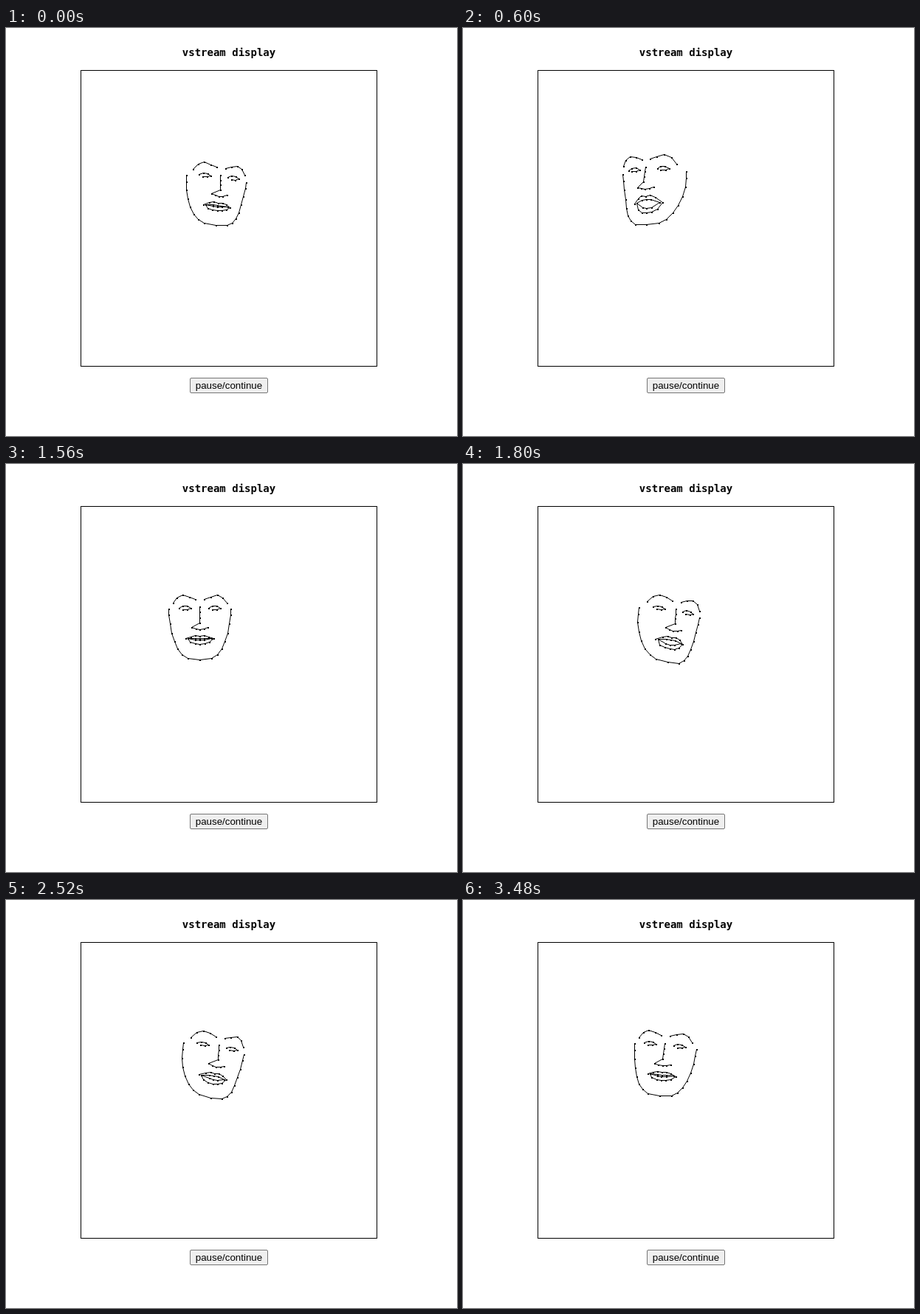
These frames come from a looping animation (611 px wide and 553 px high, 3600 ms). An HTML page with a canvas:

```html
<!DOCTYPE html>
<html lang="en">
<head>
<meta charset="utf-8">
<title>vstream display</title>
<style>
  html, body { margin: 0; width: 611px; height: 553px; overflow: hidden; background: #fff; }
  body { position: relative; }
  canvas { position: absolute; left: 0; top: 0; }
  h1 {
    position: absolute; left: 102px; top: 24px; width: 400px; margin: 0;
    font: bold 14px/19px "DejaVu Sans Mono", monospace;
    text-align: center; color: #000;
  }
  button {
    position: absolute; left: 249px; top: 474px; width: 106px; height: 21px;
    box-sizing: border-box; margin: 0; padding: 0;
    border: 1px solid #767676; border-radius: 2px; background: #efefef;
    font: 13.333px/19px "Liberation Sans", Arial, sans-serif; color: #000;
    text-align: center; white-space: nowrap;
  }
</style>
</head>
<body>
<canvas id="stage" width="611" height="553"></canvas>
<h1>vstream display</h1>
<button type="button">pause/continue</button>
<script>
const LOOP = 3600, STEP = 120;
const ctx = document.getElementById("stage").getContext("2d");

// Head poses; angles in degrees, open = how far the lower lip drops.
const keys = [
  { t: 0,    x: 285.5, y: 205,   yaw: 7.5, pitch: 5,  roll: 6.5,   open: 0,  size: 0.97 },
  { t: 600,  x: 260,   y: 197,   yaw: -16, pitch: 9,  roll: -3,    open: 11, size: 1.03 },
  { t: 1080, x: 245.5, y: 199,   yaw: -35, pitch: 11, roll: -12.5, open: 2,  size: 1 },
  { t: 1200, x: 239,   y: 199,   yaw: -38, pitch: 11, roll: -13,   open: 1,  size: 1 },
  { t: 1560, x: 263,   y: 196.5, yaw: 0,   pitch: 0,  roll: 0,     open: 0,  size: 1 },
  { t: 1800, x: 280,   y: 202,   yaw: 11,  pitch: 6,  roll: 10,    open: 5,  size: 1 },
  { t: 2160, x: 284,   y: 203.5, yaw: 14,  pitch: 7,  roll: 12.7,  open: 7,  size: 1 },
  { t: 2880, x: 280,   y: 200.5, yaw: 4,   pitch: 4,  roll: 8.3,   open: 0,  size: 1 },
  { t: 3480, x: 275,   y: 199,   yaw: -2,  pitch: 2,  roll: 5.5,   open: 0,  size: 1 }
];

// Right half of the face, outside to centre: x, y, depth, share of the mouth opening.
const brow = [[36.5, -7.5, 19], [31, -15, 25], [23.5, -18.5, 31], [14.5, -16, 35], [6, -13, 37]];
const eye = [[28, -1, 25], [23, -3.5, 28], [17, -3.5, 29], [12, -1, 28], [17, 1, 29], [23, 1, 28]];
const nostril = [[11, 25.5, 47], [5.5, 27.5, 49], [0, 28.5, 50]];
const upperLip = [[19, 40.5, 35, 0.4], [12, 38, 43, 0.1], [6, 36.5, 47], [0, 37.5, 48]];
const lowerLip = [[13, 45.5, 42, 0.8], [6.5, 47.5, 47, 1], [0, 48.5, 49, 1]];
const upperInner = [[16, 40.5, 38, 0.4], [6, 40.5, 45, 0.1], [0, 40.5, 46, 0.1]];
const lowerInner = [[6, 42, 45, 0.9], [0, 42.5, 46, 1]];

const flip = half => half.map(([x, ...rest]) => [-x, ...rest]);
const span = half => [...flip(half), ...half.slice(0, -1).reverse()];
const ring = (top, low) => [...span(top), ...span(low).reverse()];

const bridge = [0, 1, 2, 3].map(i => [0, -2.5 + 22 * i / 3, 40 + 16 * i / 3]);
const inner = ring(upperInner, lowerInner);
const paths = [
  flip(brow),
  brow,
  [...bridge, ...span(nostril)],
  flip(eye),
  [...eye.slice(0, 4).reverse(), ...eye.slice(4).reverse()],
  [...ring(upperLip, lowerLip), ...inner]
];

// The outline keeps its width when the head turns; only the chin swings.
function jaw(turn) {
  return Array.from({ length: 17 }, (_, i) => {
    const a = Math.PI * i / 16, c = Math.cos(a), s = Math.sin(a);
    const x = -42 * Math.sign(c) * Math.abs(c) ** 0.6;
    return [x / turn, 69 * s ** 1.25, 50 * s ** 3, 0.6 * s ** 3];
  });
}

function poseAt(t) {
  const i = Math.max(1, keys.findIndex(k => k.t >= t));
  const a = keys[i - 1], b = keys[i], k = (t - a.t) / (b.t - a.t);
  const pose = {};
  for (const name in a) pose[name] = a[name] + (b[name] - a[name]) * k;
  return pose;
}

function projector(pose) {
  const [yaw, pitch, roll] = [pose.yaw, pose.pitch, pose.roll].map(d => d * Math.PI / 180);
  return ([x, y, z, drop = 0]) => {
    const u = x * Math.cos(yaw) + z * Math.sin(yaw);
    const v = y - z * Math.sin(pitch) + drop * pose.open;
    return [
      Math.round(pose.x + pose.size * (u * Math.cos(roll) - v * Math.sin(roll))),
      Math.round(pose.y + pose.size * (u * Math.sin(roll) + v * Math.cos(roll)))
    ];
  };
}

function trace(points) {
  ctx.beginPath();
  for (const [x, y] of points) ctx.lineTo(x - 0.5, y - 0.5);
  ctx.stroke();
  for (const [x, y] of points) ctx.fillRect(x - 1, y - 1, 2, 2);
}

function draw(t) {
  const pose = poseAt(t), project = projector(pose);
  ctx.clearRect(0, 0, 611, 553);
  ctx.strokeRect(101.5, 57.5, 401, 401);
  const outline = jaw(Math.cos(pose.yaw * Math.PI / 180));
  for (const path of [outline, ...paths]) trace(path.map(project));
  trace([inner[inner.length - 1], inner[0]].map(project));
}

function tick() {
  const t = performance.now() % LOOP;
  draw(Math.floor(t / STEP) * STEP);
  requestAnimationFrame(tick);
}
tick();
</script>
</body>
</html>
```
